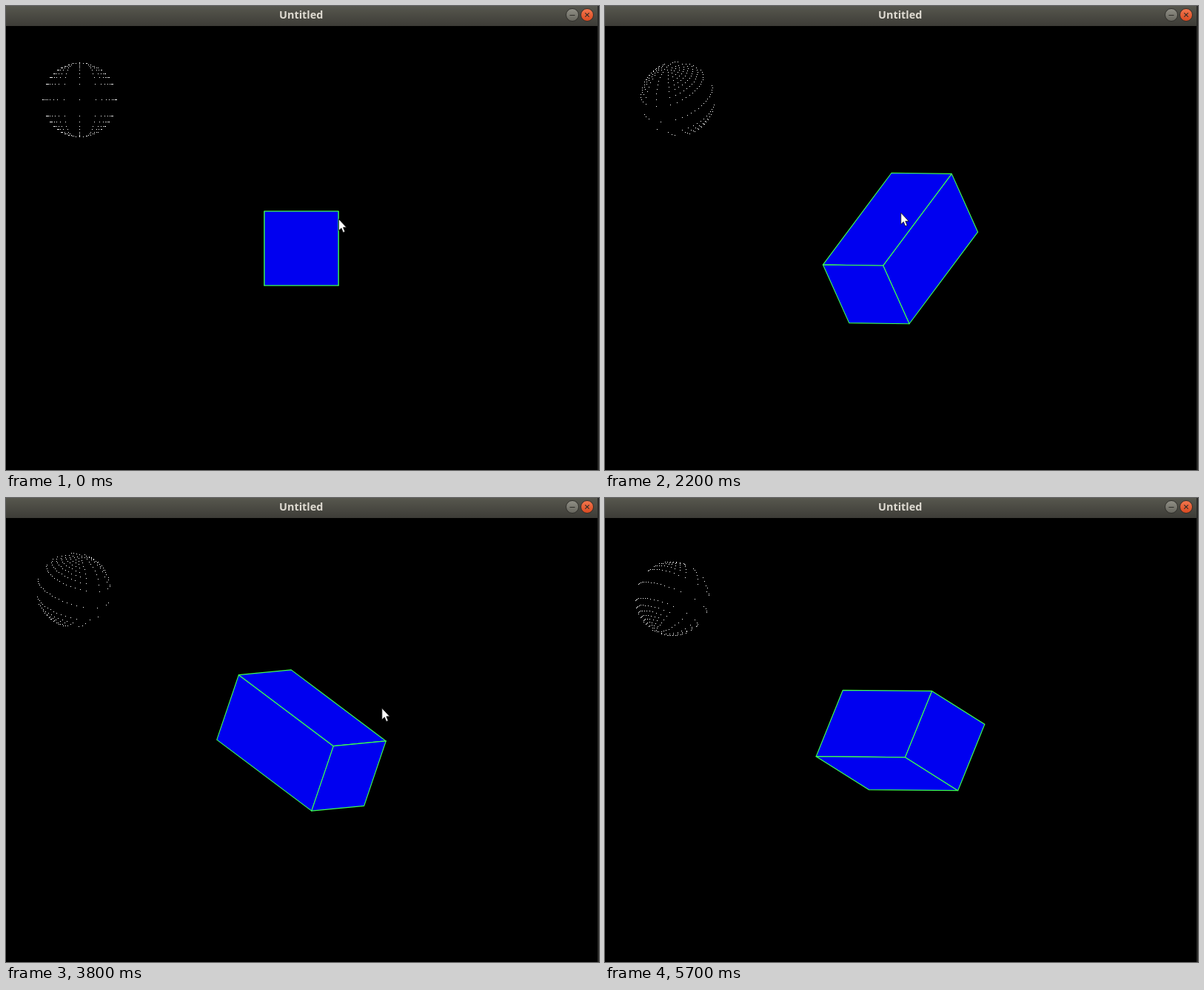
Write an HTML page that moves like this. It is 801 by 626 pixels and loops after 6500 ms.

```html
<!DOCTYPE html>
<html lang="en">
<head>
<meta charset="utf-8">
<title>Untitled</title>
<style>
html, body { margin: 0; width: 100%; height: 100%; overflow: hidden; background: #000; }
svg { display: block; width: 801px; height: 626px; }
text { font: bold 14.4px "Noto Sans", "Open Sans", sans-serif; fill: #dfdbd2; }
#box polygon { fill: #0000f0; stroke: #3cff50; stroke-width: 1.15; stroke-linejoin: round; }
</style>
</head>
<body>
<svg viewBox="0 0 801 626" width="801" height="626">
  <defs>
    <linearGradient id="bar" x1="0" y1="0" x2="0" y2="1">
      <stop offset="0" stop-color="#57574e"/>
      <stop offset="1" stop-color="#3d3c37"/>
    </linearGradient>
    <linearGradient id="grey" x1="0" y1="0" x2="0" y2="1">
      <stop offset="0" stop-color="#919087"/>
      <stop offset="1" stop-color="#66655d"/>
    </linearGradient>
    <linearGradient id="red" x1="0" y1="0" x2="0" y2="1">
      <stop offset="0" stop-color="#f4784f"/>
      <stop offset="1" stop-color="#d9481f"/>
    </linearGradient>
  </defs>
  <rect width="801" height="626"/>
  <rect width="801" height="27" fill="url(#bar)"/>
  <rect x="799" width="2" height="626" fill="#2b2b29"/>
  <text x="398.7" y="17" text-anchor="middle">Untitled</text>
  <g stroke="#2f2e2a">
    <circle cx="765" cy="12" r="8.5" fill="url(#grey)"/>
    <circle cx="785" cy="12" r="8.5" fill="url(#red)"/>
    <path d="M761.5 12.5h7M782.3 9.3l5.4 5.4M787.7 9.3l-5.4 5.4" fill="none" stroke-width="1.2"/>
  </g>
  <path id="dots" fill="#fff" shape-rendering="crispEdges"/>
  <g id="box"></g>
  <path id="cursor" d="M.5 .5V16L4 12.7L6.4 18.5L8.9 17.5L6.5 11.8H11z" fill="#fff" stroke="#111" stroke-width=".8"/>
</svg>
<script>
const LOOP = 6500, TICK = 100, RADIUS = 50, STEP = 5;
const HALF = [50, 50, 100];
const PIVOT = [77.9, 121.4], OFFSET = [21.5, 5, 1.5];
const $ = id => document.getElementById(id);

// Pointer moves and drags: from, to, then pointer x, y and, for a drag, pitch, yaw, roll
const START = [449, 287, 0, 0, 0];
const moves = [
  [200, 400, 450, 293],
  [500, 700, 427, 338],
  [800, 900, 420, 345, 39, 13, -2],
  [1000, 1100, 413, 329, 70, 26, -12],
  [1200, 1600, 413, 317, 65, 26.3, -12.5],
  [1600, 1900, 385, 275, 53, 31, -27],
  [2000, 2800, 442, 289, 18.2, 17.3, -13],
  [2800, 3300, 484, 297, 20.2, 0, -7.4],
  [3400, 4000, 519, 276, 47.9, -59.7, 37.7],
  [4100, 5000, 494.5, 252, 18.8, -51.7, 31.1],
  [5000, 5200, 452, 224, .4, -37, 26.9],
  [5200, 5600, 30, 2]
];

function stateAt(t) {
  let s = START;
  for (const [from, to, ...goal] of moves) {
    const f = Math.min(1, Math.max(0, (t - from) / (to - from)));
    s = s.map((v, i) => i in goal ? v + (goal[i] - v) * f : v);
  }
  return s;
}

const dot = (a, b) => a[0] * b[0] + a[1] * b[1] + a[2] * b[2];

// Matrix rows: roll about z, then yaw about y, then pitch about x; z points away
function rotation(angles) {
  const [p, q, r] = angles.map(a => a * Math.PI / 180);
  const { sin, cos } = Math;
  const x = [cos(q) * cos(r), -cos(q) * sin(r), sin(q)];
  const y = [sin(r), cos(r), 0];
  const z = [-sin(q) * cos(r), sin(q) * sin(r), cos(q)];
  return [
    x,
    y.map((v, i) => cos(p) * v - sin(p) * z[i]),
    y.map((v, i) => sin(p) * v + cos(p) * z[i])
  ];
}

// Sphere: circles of growing radius, each sampled at even steps of depth
const points = [];
for (let r = 0; r <= RADIUS; r += STEP)
  for (let z = -r; z <= r; z += STEP) {
    const x = Math.sqrt(r * r - z * z), y = Math.sqrt(RADIUS * RADIUS - r * r);
    points.push([x, y, z], [-x, y, z], [x, -y, z], [-x, -y, z]);
  }

function drawSphere(R) {
  const place = (p, i) => Math.round(PIVOT[i] + dot(R[i], p) + dot(R[i], OFFSET));
  const d = points.filter(p => dot(R[2], p) < .01)
    .map(p => `M${place(p, 0)} ${place(p, 1)}h1v1h-1z`);
  $("dots").setAttribute("d", [...new Set(d)].join(""));
}

const faces = [];
for (let axis = 0; axis < 3; axis++)
  for (const side of [-1, 1]) {
    const el = document.createElementNS("http://www.w3.org/2000/svg", "polygon");
    $("box").appendChild(el);
    faces.push({ axis, side, el });
  }

function drawBox(R) {
  for (const { axis, side, el } of faces) {
    const shown = side * R[2][axis] < .001;
    el.style.display = shown ? "" : "none";
    if (!shown) continue;
    const j = (axis + 1) % 3, k = (axis + 2) % 3;
    el.setAttribute("points", [[-1, -1], [1, -1], [1, 1], [-1, 1]].map(([u, v]) => {
      const p = [];
      p[axis] = side * HALF[axis];
      p[j] = u * HALF[j];
      p[k] = v * HALF[k];
      return (399 + dot(R[0], p)).toFixed(2) + "," + (327 + dot(R[1], p)).toFixed(2);
    }).join(" "));
  }
}

function draw(t) {
  const [x, y, ...angles] = stateAt(t), R = rotation(angles);
  drawSphere(R);
  drawBox(R);
  $("cursor").setAttribute("transform", `translate(${x} ${y})`);
  $("cursor").style.display = t < 5700 ? "" : "none";
}

const start = performance.now();
let last = -1;
function frame() {
  const t = Math.floor(((performance.now() - start) % LOOP) / TICK) * TICK;
  if (t !== last) draw(last = t);
  requestAnimationFrame(frame);
}
frame();
</script>
</body>
</html>
```
